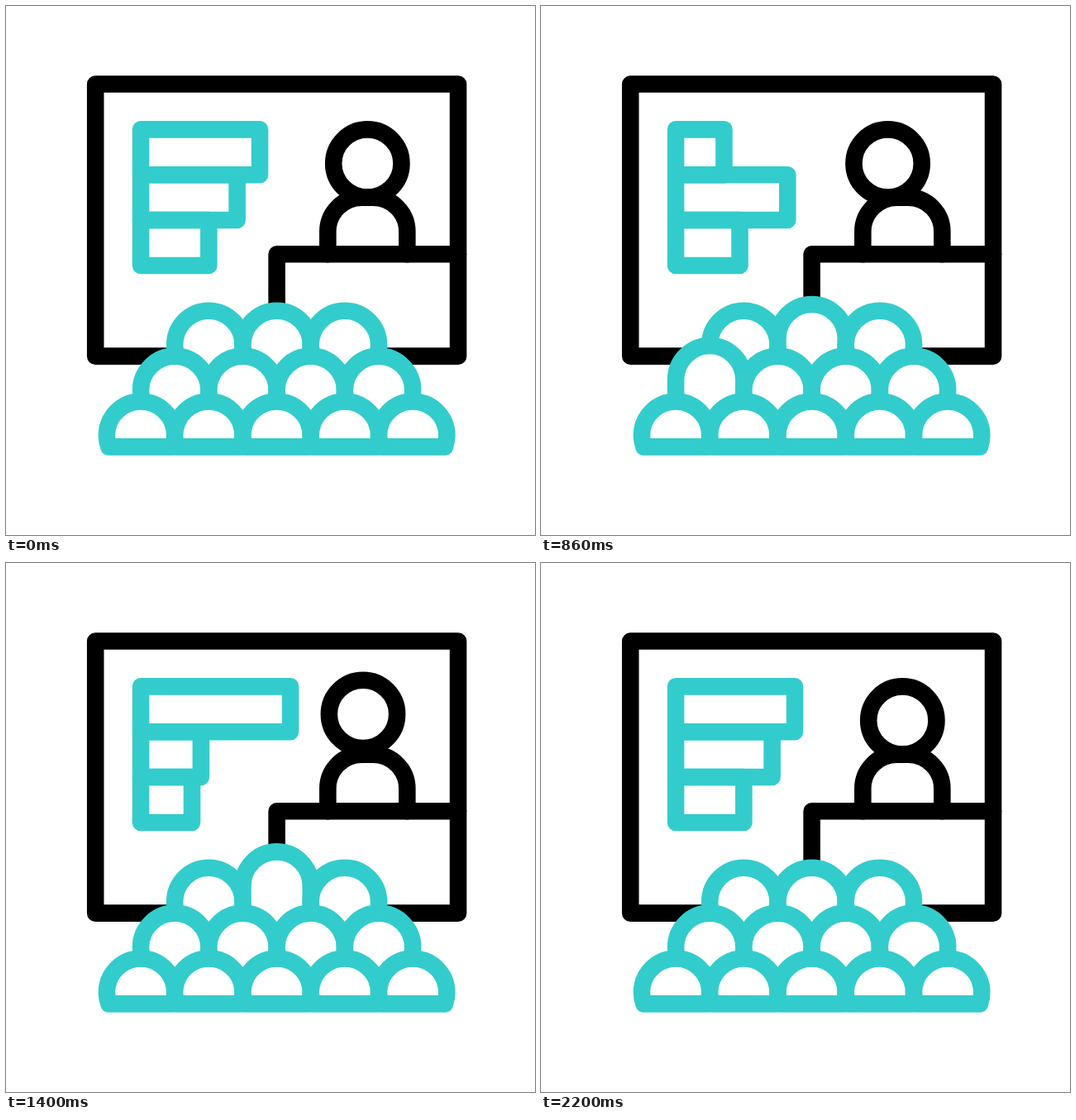
Write an HTML page that moves like this. It is 640 by 640 pixels and loops after 2400 ms.

```html
<!DOCTYPE html>
<html lang="en">
<head>
<meta charset="utf-8">
<title>Lecture audience</title>
<style>
  html, body { margin: 0; width: 100%; height: 100%; overflow: hidden; background: #fff; }
  svg { display: block; width: 100vw; height: 100vh; }
  g { stroke-width: 3; stroke-linejoin: round; stroke-linecap: round; }
  .dark { stroke: #000; fill: none; }
  .teal { stroke: #3cc; fill: #fff; }
  #bars { fill: none; }
</style>
</head>
<body>
<svg viewBox="0 0 640 640">
  <!-- One grid unit is a third of the line width. -->
  <g transform="translate(108.2 94.5) scale(6.857)">
    <g class="dark">
      <rect width="64" height="48"/>
      <path d="M32 44V30H64"/>
      <path d="M41 30V26A6 6 0 0 1 47 20H49A6 6 0 0 1 55 26V30"/>
      <circle id="head" r="6"/>
    </g>
    <g class="teal" id="bars"></g>
    <g class="teal" id="crowd"></g>
  </g>
</svg>
<script>
const LOOP = 2400, STEP = 20, BEAT = 200;
const R = 6, ROW = 8;

function add(parent, tag, attrs) {
  const el = document.createElementNS("http://www.w3.org/2000/svg", tag);
  set(el, attrs);
  return document.getElementById(parent).appendChild(el);
}

function set(el, attrs) {
  for (const k in attrs) el.setAttribute(k, attrs[k]);
}

// Eased shift by a distance between two beats.
function shift(beat, from, to, distance) {
  const u = Math.min(1, Math.max(0, (beat - from) / (to - from)));
  return distance * u * u * (3 - 2 * u);
}

// Rises by a height over three beats, sinks back over two.
function rise(beat, up, down, height) {
  return shift(beat, up, up + 3, height) - shift(beat, down, down + 2, height);
}

// A dome whose arc is lifted while its foot stays put; only the front row has a base line.
function dome(x, y, lift, front) {
  const foot = front ? 2 : 5, half = Math.sqrt(R * R - foot * foot);
  const arc = (px, py) => `A${R} ${R} 0 0 1 ${px} ${py}`;
  return `M${x - half} ${y + foot}` + arc(x - R, y) + `V${y - lift}` +
    arc(x + R, y - lift) + `V${y}` + arc(x + half, y + foot) + (front ? "Z" : "");
}

const bars = [0, 1, 2].map(i =>
  add("bars", "rect", { x: 8, y: 8 + ROW * i, height: ROW }));

const rows = [0, 1, 2].map(row => {
  const y = 46 + ROW * row, front = row === 2;
  return Array.from({ length: row + 3 }, (_, i) => {
    const x = 32 + (2 * i - row - 2) * R;
    const el = add("crowd", "path", {});
    const lift = h => set(el, { d: dome(x, y, h, front) });
    lift(0);
    return lift;
  });
});
const liftMiddle = rows[0][1], liftLeft = rows[1][0];
const head = document.getElementById("head");

function draw(t) {
  const b = t / BEAT;
  set(head, {
    cx: 48 + shift(b, 2, 5, -3) + shift(b, 5, 8, 3),
    cy: 14 + shift(b, 5, 8, -1.5) + shift(b, 8, 10, 1.5)
  });
  set(bars[0], { width: 21 + shift(b, 1, 4, -13) + shift(b, 4, 7, 18.4) + shift(b, 7, 10, -5.4) });
  set(bars[1], { width: 17 + shift(b, 2, 4, 2.9) + shift(b, 4, 8, -11) + shift(b, 8, 11, 8.1) });
  set(bars[2], { width: 12 + shift(b, 1, 3, 1.5) + shift(b, 3, 6, -5.5) + shift(b, 6, 9, 4) });
  liftLeft(rise(b, 1, 5, 1.83));
  liftMiddle(rise(b, 3, 7, 2.83));
}

const start = performance.now();
function tick() {
  const t = (performance.now() - start) % LOOP;
  draw(Math.floor(t / STEP) * STEP);
  requestAnimationFrame(tick);
}
tick();
</script>
</body>
</html>
```
